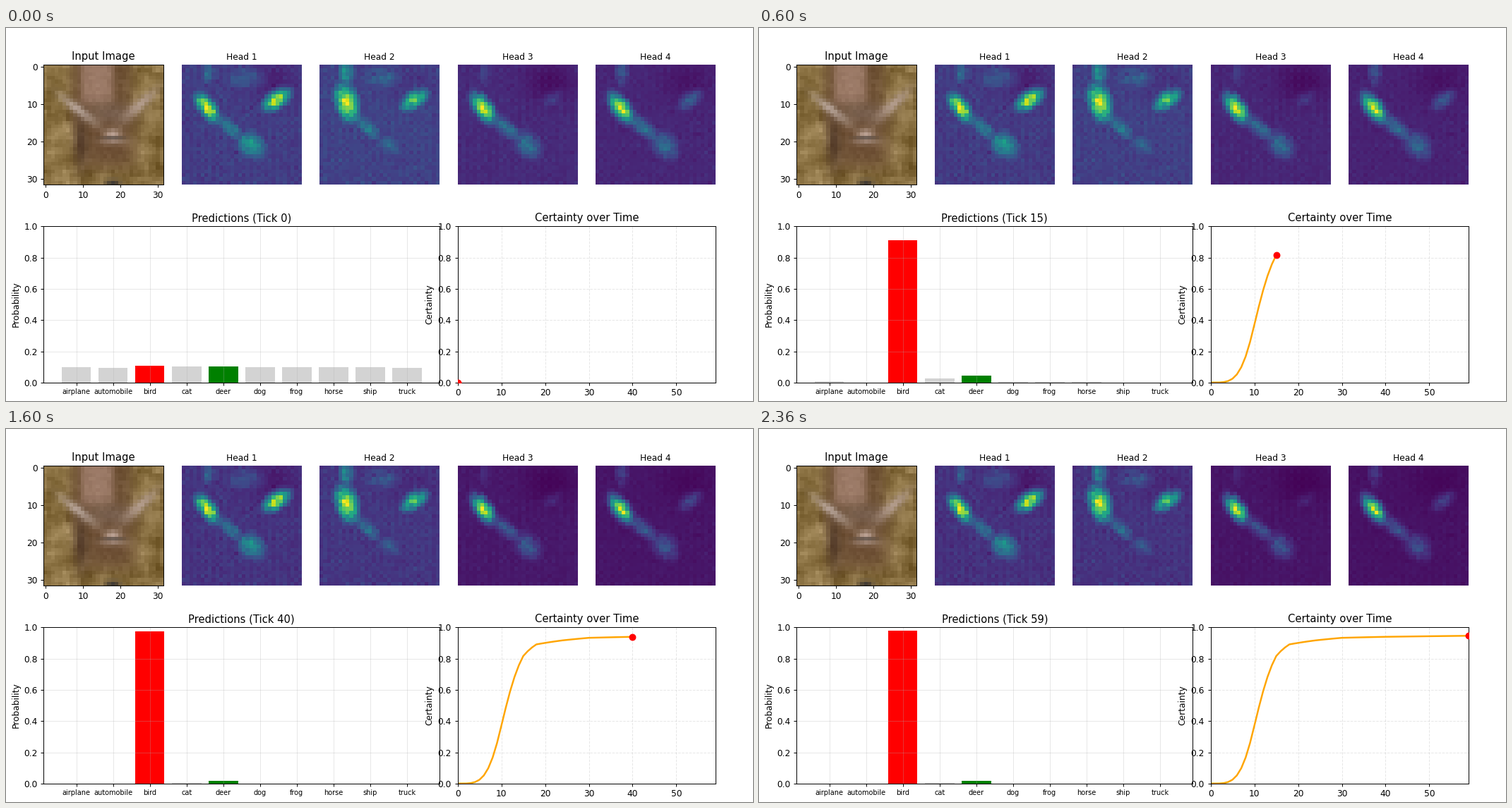
Write a matplotlib script that moves like this. It is 1058 px wide and 529 px high and loops after 2400 ms.

```python
import numpy as np
import matplotlib.pyplot as plt
from matplotlib.animation import FuncAnimation
from matplotlib.colors import to_rgb

WIDTH, HEIGHT, TICKS = 1058, 529, 60
plt.rcParams["font.family"] = "DejaVu Sans"

CLASSES = "airplane automobile bird cat deer dog frog horse ship truck".split()
BIRD, CAT, DEER = 2, 3, 4

# Class probabilities at the end of the slow start.
START = 9
START_PROBS = np.array([.068, .008, .475, .12, .14, .057, .064, .045, .018, .013])

# Later states: deer, cat and all remaining classes; bird takes what is left.
LATER = {15: (.045, .024, .02), 18: (.034, .0095, .0065), 24: (.028, .005, .004),
         30: (.021, .0035, .0035), 40: (.017, .003, .004), 59: (.0165, .002, .003)}

Y, X = np.mgrid[0:32, 0:32].astype(float)
rng = np.random.default_rng(4)


def later_probs(deer, cat, rest):
    p = START_PROBS ** 2
    p[[BIRD, CAT, DEER]] = 0
    p *= rest / p.sum()
    p[CAT], p[DEER] = cat, deer
    p[BIRD] = 1 - p.sum()
    return p


KEY_TICKS = [START, *LATER]
KEY_LOGITS = np.log([START_PROBS, *(later_probs(*state) for state in LATER.values())])


def probabilities(tick):
    """Softmax of logits that sharpen first, then move between key states."""
    logits = np.array([np.interp(tick, KEY_TICKS, column) for column in KEY_LOGITS.T])
    p = np.exp(logits * np.clip((tick / START) ** 2.1, .03, 1))
    return p / p.sum()


PROBS = np.array([probabilities(t) for t in range(TICKS)])
# Certainty is one minus the normalised entropy.
CERTAINTY = 1 + (PROBS * np.log(PROBS)).sum(axis=1) / np.log(len(CLASSES))


def blob(x, y, length, width, angle=0, power=2):
    a = np.radians(angle)
    u = (X - x) * np.cos(a) + (Y - y) * np.sin(a)
    v = (Y - y) * np.cos(a) - (X - x) * np.sin(a)
    return np.exp(-0.5 * (np.abs(u / length) ** power + np.abs(v / width) ** power))


# Regions the heads look at, and how strongly each head does.
DARK = blob(24, 4, 5, 4)
REGIONS = np.array([
    blob(6.3, 11.1, 3.1, 1.55, 53),    # left ear
    blob(6.8, 9.6, 3.6, 2.1, 75),      # left ear, wide
    blob(24.7, 9, 2.9, 1.6, -33),      # right ear
    blob(18, 21, 3.3, 2.5, 42),        # muzzle
    blob(12.3, 16.3, 3.6, 1.6, 42),    # cheek
    blob(6.5, 1.5, 3.2, 1.6, 90),      # above the ear
    blob(16, 3, 5, 3),                 # forehead
])
STRENGTHS = [(1, 0, .95, .54, .42, .33, .26),
             (0, 1, .8, .3, .4, .52, .28),
             (1, 0, .17, .36, .38, .2, 0),
             (1, 0, .3, .36, .38, .27, 0)]
BASES, DARKNESS, FADES = (.2, .22, .13, .12), (.1, .05, .09, .06), (.14, .18, .38, .38)


def attention(base, darkness, strengths):
    """Glowing regions over a faint every-other-cell lattice, scaled to 0..1."""
    field = base - darkness * DARK + .2 * base * ((X % 2) * (Y % 2) - .5 * (Y % 2))
    for strength, region in zip(strengths, REGIONS):
        field = np.maximum(field, strength * region + .25 * field)
    field = np.clip(field * (1 + rng.normal(0, .09, field.shape)), .01, None)
    return field / field.max()


HEADS = [attention(*args) for args in zip(BASES, DARKNESS, STRENGTHS)]


def soft_photo():
    """A soft sketch of an animal's face on grass, in 32 by 32 cells."""
    img = np.ones((32, 32, 3)) * to_rgb("#886f40")
    noise = rng.normal(0, .014, (32, 32))
    mottle = sum(np.roll(noise, (i, j), (0, 1)) for i in range(3) for j in range(4))
    img += mottle[..., None]

    def paint(color, *shape):
        a = .85 * blob(*shape)[..., None]
        img[:] = img * (1 - a) + np.array(to_rgb(color)) * a

    paint("#684a32", 15, 5, 7.6, 10, 0, 6)
    paint("#a48270", 13.8, 4, 4, 6, 0, 6)
    paint("#6a4b34", 16.5, 20, 6.6, 6.5, 0, 4)
    paint("#4f3728", 9.5, 20, 1.3, 5)
    paint("#7a6252", 17.5, 12.5, 4.5, 2)
    paint("#c0aea4", 8.5, 11.3, 4.2, .9, 38)
    paint("#bca69c", 25.5, 10, 4, 1, -42)
    paint("#c8b0a4", 18, 17.9, 1.6, .8)
    paint("#b0988c", 18, 20.3, 2.5, .4)
    paint("#5c524e", 18, 19.2, 2.2, .3)
    paint("#302c2c", 18, 31, 1.3, .6)
    return np.clip(img + rng.normal(0, .01, (32, 32, 1)), 0, 1)


fig = plt.figure(figsize=(12, 6), dpi=WIDTH / 12)
LEFT, PITCH, CELL = 53.3, 195.46, 170.0
TOP_ROW, BOTTOM_ROW = (52.3, 222.3), (281.4, 502.8)


def add_axes(first, last, row):
    """Axes over grid columns first to last, placed in pixels."""
    top, bottom = row
    width = (last - first) * PITCH + CELL
    return fig.add_axes([(LEFT + first * PITCH) / WIDTH, 1 - bottom / HEIGHT,
                         width / WIDTH, (bottom - top) / HEIGHT])


ax_photo = add_axes(0, 0, TOP_ROW)
ax_photo.imshow(soft_photo())
ax_photo.set_title("Input Image")
ax_photo.set_xticks(range(0, 31, 10))
ax_photo.set_yticks(range(0, 31, 10))

head_images = []
for n, field in enumerate(HEADS, start=1):
    ax = add_axes(n, n, TOP_ROW)
    head_images.append(ax.imshow(field, cmap="viridis", vmin=0, vmax=1))
    ax.set_title(f"Head {n}", fontsize=10)
    ax.axis("off")

ax_bars = add_axes(0, 2, BOTTOM_ROW)
colors = ["lightgray"] * len(CLASSES)
colors[BIRD], colors[DEER] = "red", "green"
bars = ax_bars.bar(range(len(CLASSES)), PROBS[0], color=colors)
ax_bars.set_xlim(-.89, 9.89)
ax_bars.set_ylim(0, 1)
ax_bars.set_xticks(range(len(CLASSES)), CLASSES, fontsize=8)
ax_bars.set_ylabel("Probability")
ax_bars.grid(alpha=.3)
bars_title = ax_bars.set_title("")

ax_line = add_axes(3, 4, BOTTOM_ROW)
line, = ax_line.plot([], [], lw=2)
dot = ax_line.scatter([0], [0], s=50, color="red", zorder=5)
ax_line.set_xlim(0, TICKS - 1)
ax_line.set_ylim(0, 1)
ax_line.set_title("Certainty over Time")
ax_line.set_xlabel("tick")
ax_line.set_ylabel("Certainty")
ax_line.grid(alpha=.3, linestyle="--")


def update(tick):
    progress = np.sin(np.pi / 2 * tick / (TICKS - 1)) ** 2
    for image, field, fade in zip(head_images, HEADS, FADES):
        image.set_data(field ** (1 + fade * progress))
    for bar, p in zip(bars, PROBS[tick]):
        bar.set_height(p)
    bars_title.set_text(f"Predictions (Tick {tick})")
    line.set_data(np.arange(tick + 1), CERTAINTY[:tick + 1])
    line.set_color("#eedd2b" if tick < 12 else "orange")
    dot.set_offsets([[tick, CERTAINTY[tick]]])
    return [*head_images, *bars, bars_title, line, dot]


anim = FuncAnimation(fig, update, frames=TICKS, interval=40, repeat=True)
plt.show()
```
